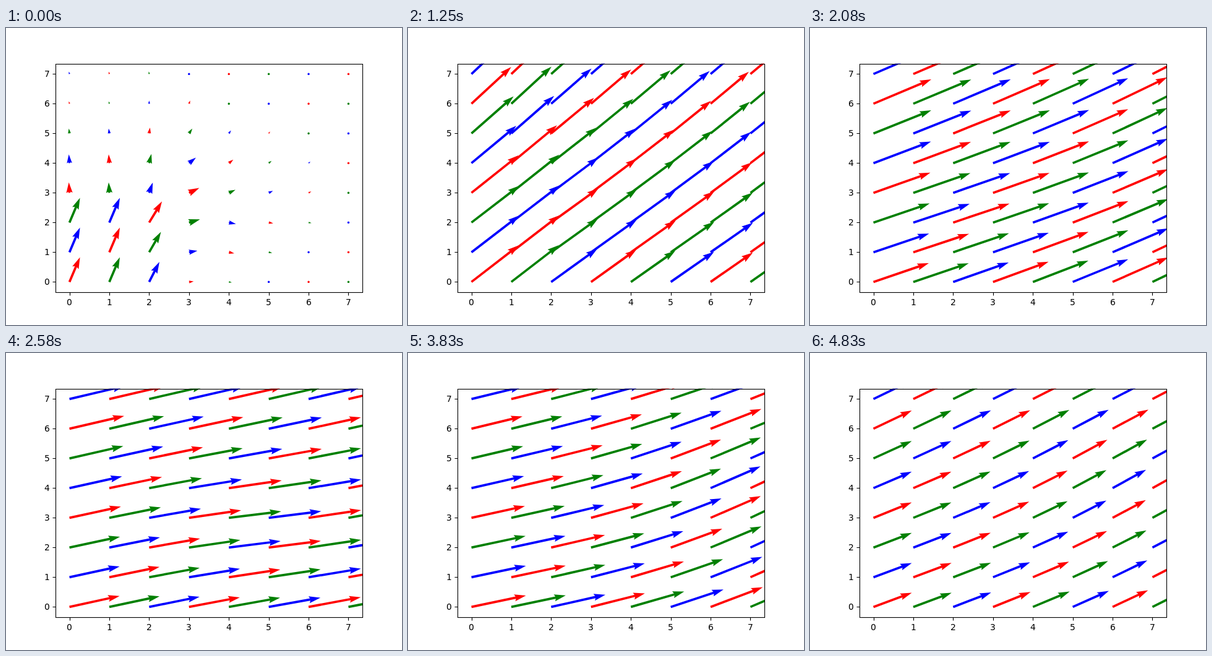
Animation, 640 px wide and 480 px high, one loop 4910 ms. Source, as an HTML page:

```html
<!DOCTYPE html>
<html>
<head>
<meta charset="utf-8">
<style>
html, body { margin: 0; width: 100%; height: 100%; overflow: hidden; background: #fff; }
svg { display: block; }
text { font: 13.89px "DejaVu Sans", sans-serif; }
</style>
</head>
<body>
<svg id="stage" width="640" height="480" viewBox="0 0 640 480">
  <clipPath id="box"><rect x="80" y="57.6" width="496" height="369.6"/></clipPath>
  <g id="arrows" clip-path="url(#box)"></g>
  <g id="axes"></g>
</svg>
<script>
const N = 8, LOOP = 4910, STEP = 250 / 3, LAST = 58;
const W = 3.72; // shaft width
const COLORS = ['#f00', '#008000', '#00f'];
const px = i => 80 + (i + 0.35) * 496 / 7.7;
const py = j => 427.2 - (j + 0.35) * 48;
const mix = (a, b, t) => a + (b - a) * t;
const bell = (x, mid, spread) => Math.exp(-((x - mid) ** 2) / spread);

function add(parent, name, attrs, text) {
  const el = document.createElementNS('http://www.w3.org/2000/svg', name);
  for (const key in attrs) el.setAttribute(key, attrs[key]);
  if (text !== undefined) el.textContent = text;
  return document.getElementById(parent).appendChild(el);
}

function drawAxes() {
  const line = { fill: 'none', stroke: '#000', 'stroke-width': 1.11 };
  const snap = v => Math.floor(v + 0.5) + 0.5;
  add('axes', 'rect', { x: 80.5, y: 58.5, width: 496, height: 369, ...line });
  for (let n = 0; n < N; n++) {
    add('axes', 'path', { d: `M${snap(px(n))} 427.5v5M80.5 ${snap(py(n))}h-5`, ...line });
    add('axes', 'text', { x: Math.round(px(n) - 4.42), y: 448 }, n);
    add('axes', 'text', { x: 62, y: Math.round(py(n) + 5) }, n);
  }
}

// Opening: a strong upward stream on the left, a weak one fading to the right.
function opening(i, j) {
  const west = i < 2 ? 1 : i === 2 ? 0.8 : 0;
  const east = i < 2 ? 0 : i === 2 ? 0.4 : 0.64 ** (i - 3);
  const low = j < 3;
  const dx = west * (low ? 17 : -1) + east * 18 * bell(j, 2.3, 6);
  const rise = low ? 40 : Math.max(4, 17 * bell(j, 3, 5.3));
  const dy = low && i > 3 ? -0.2 * dx : west * rise + east * 9 * bell(j, 4, 7);
  return [dx, dy];
}

// A field blended between its four corner vectors, plus a round swell [i, j, dx, dy].
function blend(power, sw, se, nw, ne, swell) {
  return (i, j) => {
    const u = (Math.max(i - 1, 0) / 6) ** power;
    const y = Math.max(j - 1, 0) / 6, v = y * y * (3 - 2 * y);
    const lift = bell(i, swell[0], 8) * bell(j, swell[1], 8);
    return [0, 1].map(c =>
      mix(mix(sw[c], se[c], u), mix(nw[c], ne[c], u), v) + swell[c + 2] * lift);
  };
}

const keys = [
  { at: 0, field: opening },
  { at: 9, field: blend(0.7, [50, 71], [35, 22], [24, 53], [27, 30], [3, 3.6, 8, 6]) },
  { at: 20, field: blend(1.5, [91, 43], [87, 58], [88, 54], [83, 59], [1, 3.5, 4, 0]) },
  { at: 31, field: blend(1.5, [81, 18], [85, 18], [89, 21], [83, 20], [4.4, 2.8, 1, -8.5]) },
  { at: 39, field: blend(1.5, [88, 13], [87, 13], [88, 12.5], [87, 12.5], [4.4, 3, 0, 2]) },
  { at: 46, field: blend(1.5, [88, 18.5], [84, 35], [82, 20], [85, 32], [6, 3.8, -4, 5]) },
  { at: 58, field: blend(1.5, [62, 23], [57, 28], [62, 30], [61, 31], [5.3, 3.8, -6, 1]) }
];

// Cubic Hermite curve through the keyed values.
function curve(v, k) {
  let a = 0;
  while (a < keys.length - 2 && k > keys[a + 1].at) a++;
  const slope = n => {
    const lo = Math.max(n - 1, 0), hi = Math.min(n + 1, keys.length - 1);
    return (v[hi] - v[lo]) / (keys[hi].at - keys[lo].at);
  };
  const h = keys[a + 1].at - keys[a].at, u = (k - keys[a].at) / h, w = 1 - u;
  return w * w * (1 + 2 * u) * v[a] + u * u * (3 - 2 * u) * v[a + 1]
    + h * u * w * (w * slope(a) - u * slope(a + 1));
}

// Arrow polygon; vectors shorter than the shaft width become a small hexagon.
function outline(x, y, dx, dy) {
  const len = Math.hypot(dx, dy);
  if (len < W) {
    return Array.from({ length: 6 }, (_, n) => {
      const a = n * Math.PI / 3;
      return [x + W / 2 * Math.cos(a), y + W / 2 * Math.sin(a)];
    });
  }
  const ux = dx / len, uy = -dy / len;
  const s = W * Math.min(1, len / (5 * W));
  const neck = len - 4.5 * s, barb = len - 5 * s;
  return [[0, 0.5], [neck, 0.5], [barb, 1.5], [len, 0], [barb, -1.5], [neck, -0.5], [0, -0.5]]
    .map(([a, b]) => [x + a * ux - b * s * uy, y + a * uy + b * s * ux]);
}

const arrows = Array.from({ length: N * N }, (_, n) => {
  const i = n % N, j = Math.floor(n / N);
  const vectors = keys.map(key => key.field(i, j));
  return {
    x: px(i), y: py(j),
    dx: vectors.map(v => v[0]), dy: vectors.map(v => v[1]),
    el: add('arrows', 'polygon', { fill: COLORS[n % 3] })
  };
});

function render(t) {
  const k = Math.min(LAST, Math.floor((t % LOOP + 3.4) / STEP));
  for (const a of arrows) {
    const pts = outline(a.x, a.y, curve(a.dx, k), curve(a.dy, k));
    a.el.setAttribute('points', pts.map(p => p[0].toFixed(2) + ',' + p[1].toFixed(2)).join(' '));
  }
}

drawAxes();
render(0);
const begin = performance.now();
function tick() {
  render(performance.now() - begin);
  requestAnimationFrame(tick);
}
requestAnimationFrame(tick);
</script>
</body>
</html>
```
